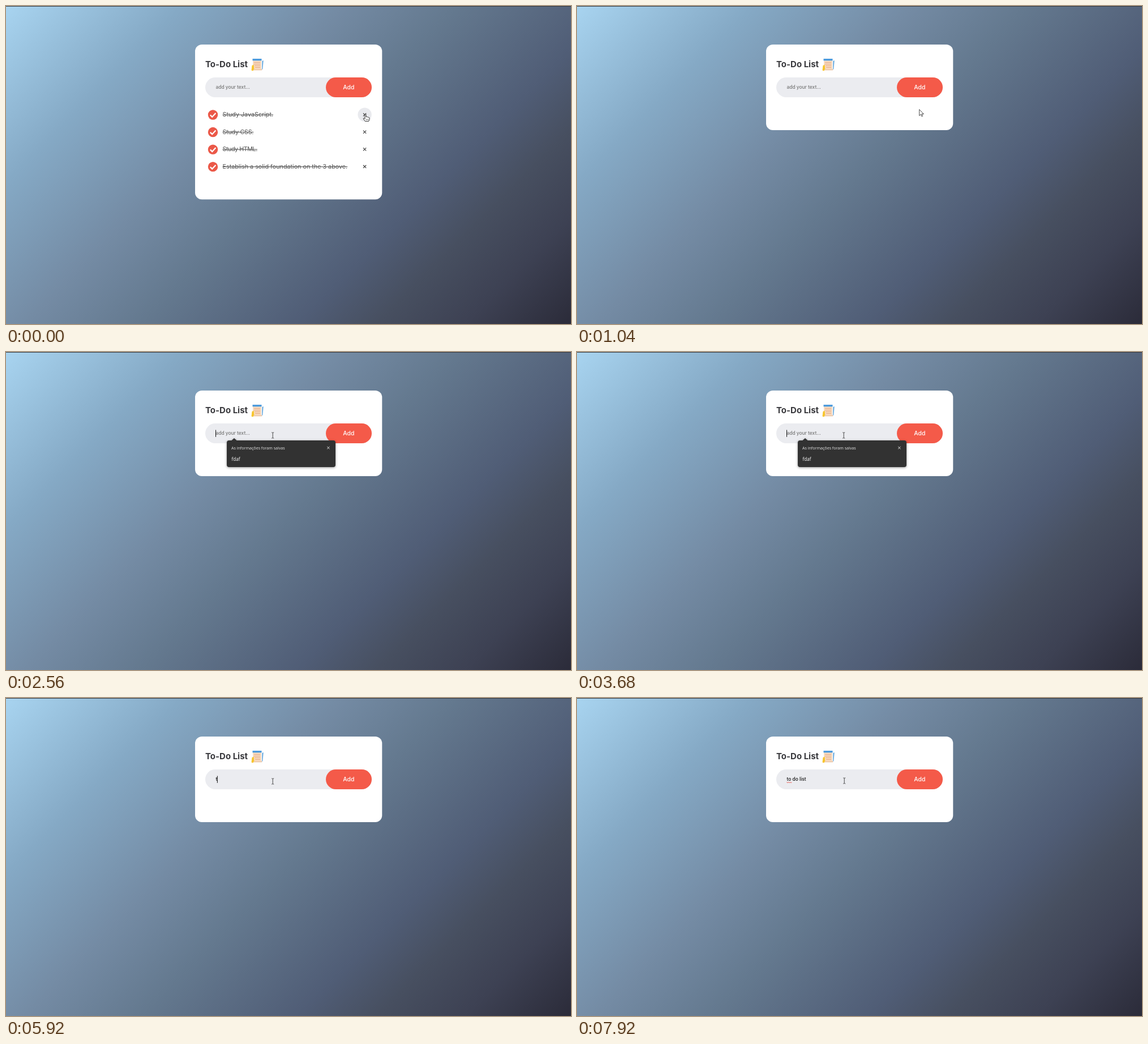
Write an HTML page that moves like this. It is 998 px wide and 561 px high and loops after 8 s.

```html
<!DOCTYPE html>
<html lang="en">
<head>
<meta charset="utf-8">
<title>To-Do List</title>
<style>
html, body { margin: 0; width: 100%; height: 100%; overflow: hidden; }
body { background: linear-gradient(135deg, #a8d4f0 0%, #85a9c5 20%, #748ba4 38%, #64798f 51%, #505d76 69%, #474f60 78%, #3d4153 88%, #2b2b39 100%); }
svg { display: block; width: 100%; height: 100%; }
text { font-family: Inter, sans-serif; white-space: pre; }
.title { font-size: 15px; font-weight: 700; fill: #39393d; }
.field { font-size: 8.4px; font-weight: 500; }
.add { font-size: 10.4px; font-weight: 500; fill: #fff; }
.item { font-size: 10.75px; fill: #555; text-decoration: line-through; }
.popup text { font-family: "Open Sans", "Noto Sans", sans-serif; }
.popup { filter: drop-shadow(0 1px 2px #0006); }
</style>
</head>
<body>
<svg viewBox="0 0 998 561">
  <rect width="998" height="1" fill="#36383d"/>
  <rect id="card" x="334" y="68" width="330.3" rx="12" fill="#fff"/>
  <text class="title" x="352" y="108.4">To-Do List</text>

  <g id="notepad">
    <path d="M436 95H451V113H436Z" fill="#f8dcc2"/>
    <path d="M435.5 93H451.5V96.4H435.5Z" fill="#4d9bdd"/>
    <path d="M438 99.5H449M438 102.5H449M439 105.5H449M440 108.5H449" stroke="#e2a178" stroke-width=".9"/>
    <path d="M433.5 113.5L434.5 105L437.5 103.5L438.5 112L436 114.5Z" fill="#f7c52e"/>
    <path d="M438 111H452V113.5H437Z" fill="#efcdb0"/>
    <path d="M452.2 97L454.8 96L453.4 111L452 112.5Z" fill="#70aee0"/>
  </g>

  <rect x="352" y="126" width="294" height="35" rx="17.5" fill="#ebecf0"/>
  <text id="field" class="field" x="370.5" y="146.4"></text>
  <path id="squiggle" d="M370.5 148.2l1.5 1.6 1.5-1.6 1.5 1.6 1.5-1.6 1.5 1.6 1.2-1.4" fill="none" stroke="#e8443a" stroke-width=".9"/>
  <rect id="caret" y="137.5" width="1" height="12.3" fill="#111"/>
  <rect x="565" y="126" width="81" height="35" rx="17.5" fill="#f45a49"/>
  <text class="add" x="605.3" y="147.2" text-anchor="middle">Add</text>

  <circle id="hover" cx="633.6" cy="191.7" r="12.2" fill="#e9eaee"/>
  <g id="list"></g>

  <g id="popup" class="popup">
    <path d="M394 156H398.5L403 152L407.5 156H578Q582 156 582 160V199Q582 203 578 203H394Q390 203 390 199V160Q390 156 394 156Z" fill="#323232"/>
    <text x="398" y="171.9" font-size="7.1" fill="#e4e4e4">As informações foram salvas</text>
    <text x="398.6" y="192" font-size="8.1" fill="#fff">fdaf</text>
    <path d="M567.2 166.8l4.4 4.4m0-4.4l-4.4 4.4" stroke="#eee" stroke-width=".9"/>
  </g>

  <g id="hand" fill="#fff" stroke="#222" stroke-width=".9" stroke-linejoin="round">
    <path d="M-1 .6Q0-.6 1 .6V5L2.6 4.8 3.2 5.4 4.8 5.3 5.4 6 6.6 6.2 7 7.2V9.8L5.6 12.8H-.6L-3.8 8.4Q-3.8 7-2.6 7.2L-1 8.6Z"/>
    <path d="M1.2 8.6V11M3 8.6V11M4.8 8.6V11" stroke-width=".6"/>
  </g>
  <path id="arrow" d="M0 0V11L2.6 8.6 4.4 12.4 6 11.6 4.3 8H7.7Z" fill="#fff" stroke="#222" stroke-width=".8"/>
  <path id="beam" d="M-2-5H-.6L0-4.4 .6-5H2M0-4.4V4.4M-2 5H-.6L0 4.4 .6 5H2" fill="none" stroke="#333" stroke-width=".9"/>
</svg>
<script>
const LOOP = 8000, ROW = 30.55, FOCUS = 1440, BLINK = 533;
const $ = id => document.getElementById(id);
const show = (id, on) => $(id).setAttribute('visibility', on ? 'visible' : 'hidden');

// label, letter spacing, removal time
const items = [
  ['Study JavaScript.', 0, 240],
  ['Study CSS.', -.25, 480],
  ['Study HTML.', -.45, 640],
  ['Establish a solid foundation on the 3 above.', 0, 800]
];
const phrase = 'to do list';
const keys = [5840, 6000, 6240, 6400, 6560, 6640, 6800, 7040, 7200, 7440];

$('list').innerHTML = items.map(([label, gap]) => `<g>
  <circle cx="365.5" cy="192" r="8.7" fill="#eb5848"/>
  <path d="M360.8 192.3l3.4 3.4 6.2-6.7" fill="none" stroke="#fff" stroke-width="2.2"/>
  <text class="item" x="382.5" y="195.3" letter-spacing="${gap}">${label}</text>
  <path d="M631 189.1l5.2 5.2m0-5.2l-5.2 5.2" stroke="#3c3c3c" stroke-width="1.2"/>
</g>`).join('');
const rows = [...$('list').children];

function drawList(t) {
  const gone = items.filter(item => t >= item[2]).length;
  rows.forEach((row, i) => {
    row.setAttribute('visibility', i < gone ? 'hidden' : 'visible');
    row.setAttribute('transform', `translate(0 ${(i - gone) * ROW})`);
  });
  const left = items.length - gone;
  $('card').setAttribute('height', 151 + left * ROW);
  show('hover', left > 0);
  return left;
}

function drawField(t) {
  const typed = phrase.slice(0, keys.filter(k => t >= k).length);
  const field = $('field');
  field.textContent = typed || 'add your text...';
  field.setAttribute('fill', typed ? '#111' : '#757575');
  $('caret').setAttribute('x', 370 + (typed ? field.getComputedTextLength() : 0));
  const lit = typed ? t < 7920 : Math.floor((t - FOCUS) / BLINK) % 2 === 0;
  show('caret', t >= FOCUS && lit);
  show('squiggle', t >= 6320);
  show('popup', t >= 1520 && t < keys[0]);
}

function drawCursor(t, left) {
  const p = Math.min(1, Math.max(0, (t - 920) / 440));
  const e = p * p * (3 - 2 * p);
  const nudge = t >= 7920 ? 1 : 0;
  const x = 635 - 163.8 * e + nudge, y = 190.6 - 43.6 * e - nudge;
  const kind = left ? 'hand' : y < 161 ? 'beam' : 'arrow';
  for (const id of ['hand', 'arrow', 'beam']) {
    show(id, id === kind);
    $(id).setAttribute('transform', `translate(${x} ${y})`);
  }
}

function draw(now) {
  const t = now % LOOP;
  const left = drawList(t);
  drawField(t);
  drawCursor(t, left);
}

const start = performance.now();
function tick() {
  draw(performance.now() - start);
  requestAnimationFrame(tick);
}
tick();
</script>
</body>
</html>
```
